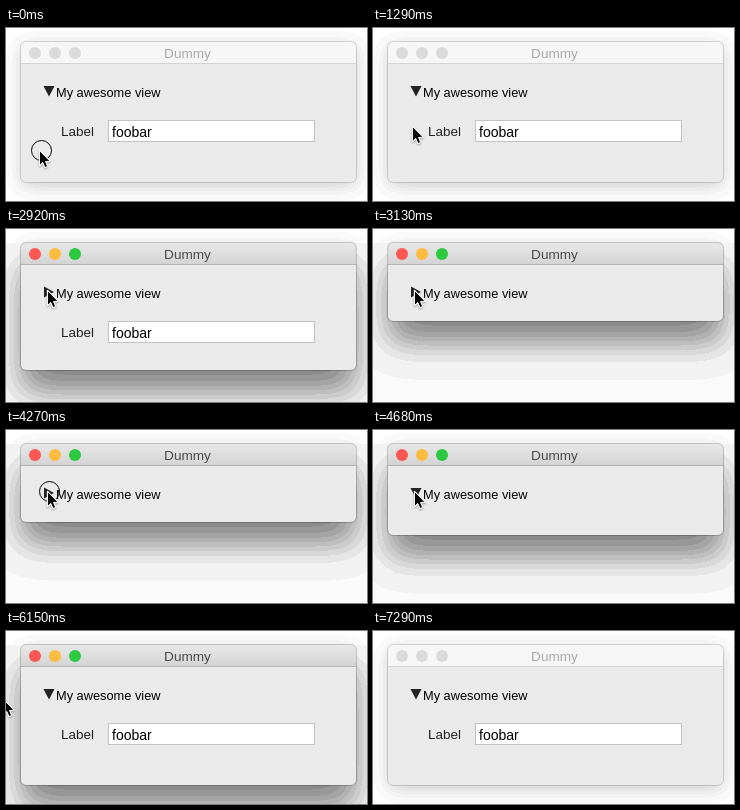
Write an HTML page with a canvas that moves like this. It is 361 px wide and 173 px high and loops after 7.4 s.

```html
<!DOCTYPE html>
<html lang="en">
<head>
<meta charset="utf-8">
<title>Collapsible view</title>
<style>
html, body { margin: 0; width: 100%; height: 100%; overflow: hidden; background: #fff; }
canvas { display: block; }
</style>
</head>
<body>
<canvas id="stage" width="361" height="173"></canvas>
<script>
const W = 361, H = 173, LOOP = 7400;
const ctx = document.getElementById('stage').getContext('2d');
const LEFT = 15, TOP = 14, RIGHT = 350, OPEN = 154, CLOSED = 92;
const FONT = '"Liberation Sans", Arial, sans-serif';

const TIMES = { active: 2690, collapse: 2860, expand: 4620, leave: 5750, gone: 6260, inactive: 7290 };
const RESIZE = [[0, .02], [60, .21], [120, .62], [180, .9], [230, 1]];

// Pointer key points: time, x, y
const PATH = [
  [880, 33, 122], [1290, 39, 97.5], [1640, 40, 78], [1690, 40, 76], [1870, 40, 72],
  [2049, 40, 72], [2050, 41, 67], [2219, 41, 67], [2570, 41, 61],
  [5694, 41, 61], [6260, -14, 70]
];
const within = (t, a, b) => t >= a && t < b;

function resizeProgress(t, start) {
  let p = 0;
  for (const [delay, value] of RESIZE) if (t >= start + delay) p = value;
  return p;
}

function windowBottom(t) {
  const span = OPEN - CLOSED;
  return Math.round(OPEN - span * resizeProgress(t, TIMES.collapse)
                         + span * resizeProgress(t, TIMES.expand));
}

// The pointer advances in steps of about 57 ms while it moves
function stepTime(t) {
  for (const [start, end, steps] of [[940, 1640, 12], [1690, 1870, 2], [2220, 2570, 5], [5750, 6260, 9]]) {
    if (t >= start && t < end) {
      const step = (end - start) / steps;
      return start + Math.floor((t - start) / step + .001) * step;
    }
    if (t < start) break;
  }
  return t;
}

function pointerAt(time) {
  const t = time < 940 ? 0 : stepTime(time);
  let a = PATH[0];
  for (const b of PATH) {
    if (t < b[0]) {
      const k = Math.max(0, (t - a[0]) / (b[0] - a[0] || 1));
      return [Math.round(a[1] + (b[1] - a[1]) * k), Math.round(a[2] + (b[2] - a[2]) * k)];
    }
    a = b;
  }
  return [a[1], a[2]];
}

// Banded window shadow: a blurred rectangle reduced to a few grey levels
const cdf = z => 1 / (1 + Math.exp(-(1.5976 * z + .07056 * z * z * z)));
const ACTIVE = { dy: 22, sigma: 16, alpha: .48, step: 13, bias: .1, base: 250 };
const INACTIVE = { dy: 4, sigma: 9, alpha: .2, step: 6, bias: .4, base: 255 };
const shadows = new Map();

function coverage(start, end, s) {
  return Float32Array.from({ length: Math.max(W, H) },
    (_, i) => cdf((i + .5 - start) / s) - cdf((i + .5 - end) / s));
}

function shadow(bottom, active) {
  const key = bottom + '/' + active;
  if (shadows.has(key)) return shadows.get(key);
  const image = ctx.createImageData(W, H);
  const profile = style => ({
    ...style,
    cols: coverage(LEFT, RIGHT, style.sigma),
    rows: coverage(TOP + style.dy, bottom + style.dy, style.sigma)
  });
  const soft = profile(INACTIVE), main = active ? profile(ACTIVE) : soft;
  for (let y = 0; y < H; y++) {
    const s = y < TOP ? soft : main;
    for (let x = 0; x < W; x++) {
      const depth = 255 * s.alpha * s.cols[x] * s.rows[y];
      const level = Math.max(0, Math.ceil(depth / s.step - s.bias));
      const grey = Math.min(s.base, 255 - level * s.step);
      const i = (y * W + x) * 4;
      image.data.fill(grey, i, i + 3);
      image.data[i + 3] = 255;
    }
  }
  shadows.set(key, image);
  return image;
}

function text(str, x, y, size, color, align = 'left') {
  ctx.font = `${size}px ${FONT}`;
  ctx.textAlign = align;
  ctx.fillStyle = color;
  ctx.fillText(str, x, y);
}

function polygon(points) {
  ctx.beginPath();
  points.forEach(([x, y]) => ctx.lineTo(x, y));
  ctx.closePath();
}

function disc(x, y, r, color) {
  ctx.beginPath();
  ctx.arc(x, y, r, 0, Math.PI * 2);
  ctx.fillStyle = color;
  ctx.fill();
}

function drawWindow(bottom, active) {
  ctx.save();
  ctx.beginPath();
  ctx.roundRect(LEFT, TOP, RIGHT - LEFT, bottom - TOP, 5);
  ctx.clip();
  ctx.fillStyle = '#eaeaea';
  ctx.fillRect(LEFT, TOP, RIGHT - LEFT, bottom - TOP);
  const bar = ctx.createLinearGradient(0, TOP, 0, 36);
  bar.addColorStop(0, active ? '#e8e8e8' : '#f6f6f6');
  bar.addColorStop(1, active ? '#d3d3d3' : '#f6f6f6');
  ctx.fillStyle = bar;
  ctx.fillRect(LEFT, TOP, RIGHT - LEFT, 22);
  ctx.fillStyle = active ? '#b4b4b4' : '#d4d4d4';
  ctx.fillRect(LEFT, 35, RIGHT - LEFT, 1);
  ctx.restore();

  ctx.beginPath();
  ctx.roundRect(LEFT - .5, TOP - .5, RIGHT - LEFT + 1, bottom - TOP + 1, 5.5);
  ctx.strokeStyle = active ? 'rgba(0,0,0,.2)' : 'rgba(0,0,0,.14)';
  ctx.lineWidth = 1;
  ctx.stroke();

  ['#fc5753', '#fdbc40', '#2bc840'].forEach((color, i) =>
    disc(29 + i * 20, 25, 6, active ? color : '#dadada'));
  text('Dummy', 181.5, 30, 13.6, active ? '#4a4a4a' : '#a9a9a9', 'center');
}

function drawContent(bottom, open) {
  polygon(open ? [[37.5, 58], [48.5, 58], [43, 68.5]] : [[38, 57.5], [38, 68.5], [48, 63]]);
  ctx.fillStyle = '#222';
  ctx.fill();
  text('My awesome view', 50, 69, 12.8, '#000');

  ctx.save();
  ctx.beginPath();
  ctx.rect(LEFT, 74, RIGHT - LEFT, Math.max(0, bottom - 18 - 74));
  ctx.clip();
  text('Label', 55, 108, 13.5, '#222');
  ctx.fillStyle = '#fff';
  ctx.fillRect(102, 92, 207, 22);
  ctx.strokeStyle = '#c2c2c2';
  ctx.strokeRect(102.5, 92.5, 206, 21);
  text('foobar', 106, 109, 14, '#000');
  ctx.restore();
}

function drawPointer([x, y], pressed) {
  if (pressed) {
    ctx.beginPath();
    ctx.arc(x + 2.5, y + .5, 10, 0, Math.PI * 2);
    ctx.strokeStyle = '#000';
    ctx.lineWidth = 1;
    ctx.stroke();
  }
  ctx.save();
  ctx.translate(x, y);
  polygon([[.5, .5], [.5, 15.5], [3.8, 12.4], [6, 17.5], [8.6, 16.4], [6.5, 11.5], [11, 11.2]]);
  ctx.shadowColor = 'rgba(0,0,0,.35)';
  ctx.shadowBlur = 2;
  ctx.shadowOffsetY = 1;
  ctx.lineJoin = 'round';
  ctx.lineWidth = 1.4;
  ctx.strokeStyle = '#fff';
  ctx.fillStyle = '#000';
  ctx.stroke();
  ctx.shadowColor = 'transparent';
  ctx.fill();
  ctx.lineWidth = .9;
  ctx.stroke();
  ctx.restore();
}

function draw(t) {
  const active = within(t, TIMES.active, TIMES.inactive);
  const bottom = windowBottom(t);
  const pressed = t < 50 || within(t, 2630, TIMES.collapse) || within(t, 4270, TIMES.expand);
  ctx.putImageData(shadow(bottom, active), 0, 0);
  drawWindow(bottom, active);
  drawContent(bottom, !within(t, TIMES.collapse, TIMES.expand));
  if (t < TIMES.gone) drawPointer(pointerAt(t), pressed);
}

function loop() {
  draw(performance.now() % LOOP);
  requestAnimationFrame(loop);
}
loop();
</script>
</body>
</html>
```
